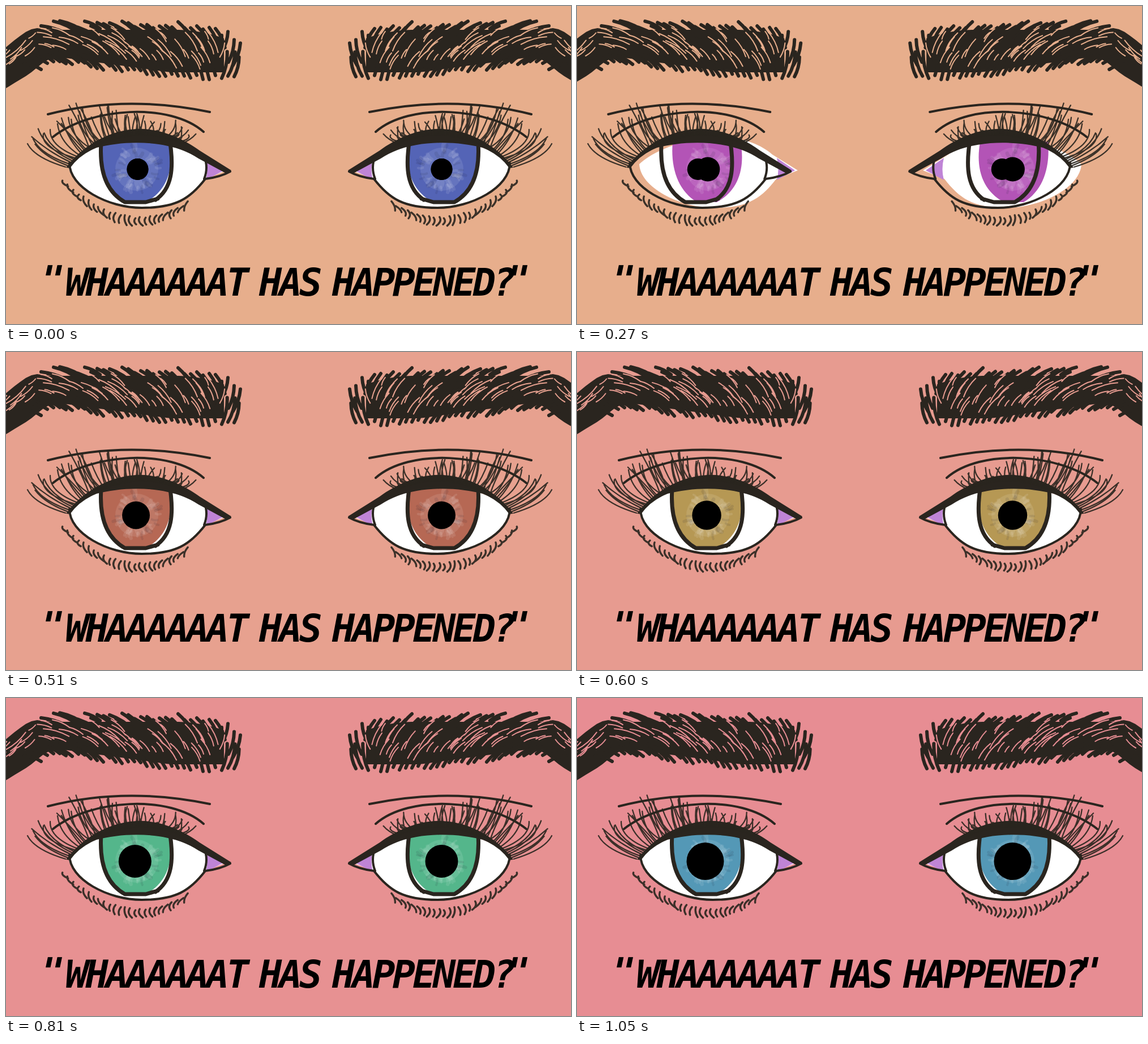
An HTML page for the animation above (1080 ms loop, 998 by 561 pixels).

```html
<!DOCTYPE html>
<html lang="en">
<head>
<meta charset="utf-8">
<title>Eyes</title>
<style>
  html, body { margin: 0; height: 100%; overflow: hidden; }
  svg { display: block; width: 100vw; height: 100vh; background: currentColor; }
  .ink { fill: none; stroke: #2a251f; stroke-linecap: round; stroke-linejoin: round; }
  .solid { fill: #2a251f; }
  .gap { fill: none; stroke: currentColor; stroke-width: 2; stroke-linecap: round; }
  text { font: italic bold 67px "DejaVu Sans Mono", monospace; letter-spacing: -4.8px; }
</style>
</head>
<body>
<svg id="stage" viewBox="0 0 998 561">
  <defs>
    <g id="eyeFill">
      <path fill="#fff" d="M110 279C150 240 280 205 345 262L390 290L352 305C325 340 300 357 240 356S112 320 110 279Z"/>
      <path fill="#bf84d6" d="M353 268L385 290L353 307Q358 288 353 268Z"/>
      <path fill="var(--iris)" d="M169 240C165 285 178 326 212 346H247C286 325 297 285 289 240Q230 230 169 240Z"/>
      <circle cx="231" cy="288" r="38" fill="#fff" opacity=".1"/>
      <g id="petals" fill="none" stroke-linecap="round"/>
    </g>
    <g id="eyeLines">
      <path class="solid" d="M106 285C140 240 190 219 230 217S310 232 342 255L398 290L390 296L340 269C290 235 210 237 160 250Q130 262 113 286Z"/>
      <path class="ink" stroke-width="4" d="M112 277C112 320 180 356 240 356S325 340 352 305Q378 302 396 292"/>
      <path class="ink" stroke-width="4" d="M350 265Q358 285 350 305M74 191Q210 156 360 187M83 231C150 178 290 170 349 222"/>
      <path class="ink" stroke-width="7" d="M168 242C165 287 174 326 210 346H247L268 340M290 242C296 285 294 322 264 342"/>
      <path id="upper" class="ink" stroke-width="2.3" opacity=".9"/>
      <path id="lower" class="ink" stroke-width="3.4" opacity=".9"/>
      <circle cx="232.5" cy="288" r="19"/>
    </g>
    <g id="brow">
      <path id="body" class="solid"/>
      <path id="hairs" class="ink" stroke-width="6"/>
      <path id="gaps" class="gap"/>
    </g>
  </defs>
  <use href="#eyeFill"/>
  <use href="#eyeFill" transform="translate(1001) scale(-1 1)"/>
  <circle id="leftPupil" cy="288"/>
  <circle id="rightPupil" cx="769.5" cy="288"/>
  <g id="lines">
    <use href="#eyeLines"/>
    <use href="#eyeLines" transform="translate(1002) scale(-1 1)"/>
    <use href="#brow"/>
    <use href="#brow" transform="translate(1021) scale(-1 1)"/>
  </g>
  <text x="105" y="511">WHAAAAAAT</text>
  <text x="447" y="511">HAS</text>
  <text x="576" y="511">HAPPENED?</text>
  <text transform="translate(56 506) skewX(-12)">"</text>
  <text transform="translate(878 506) skewX(-12)">"</text>
</svg>
<script>
const $ = id => document.getElementById(id);
const clamp = k => Math.min(1, Math.max(0, k));
const easeOut = k => 1 - (1 - clamp(k)) ** 2;
const mix = (a, b, k) => a + (b - a) * k;

let seed = 11;
const rand = (a, b) => mix(a, b, (seed = seed * 16807 % 2147483647) / 2147483647);

const curve = (...n) => {
  const [x, y, cx, cy, ex, ey] = n.map(v => v.toFixed(1));
  return `M${x} ${y}Q${cx} ${cy} ${ex} ${ey}`;
};

// A bent hair that starts at x, y and runs along an angle in degrees.
function hair(x, y, deg, len, bend) {
  const a = deg * Math.PI / 180, dx = Math.cos(a) * len, dy = Math.sin(a) * len;
  return curve(x, y, x + dx / 2 - dy * bend, y + dy / 2 + dx * bend, x + dx, y + dy);
}

function drawLashes() {
  let upper = '', lower = '';
  for (let u = 0; u <= 1; u += 1 / 62) {
    const x = 105 + 205 * u, y = 228 + 56 * ((x - 240) / 135) ** 2;
    const loose = u && 1;
    const tx = x - 67 * (1 - u) ** 2 + 16 * u + loose * rand(-13, 11);
    const ty = 174 + 69 * clamp(1 - u * 4) ** 1.5 + 34 * clamp(u * 2 - .8) + loose * rand(-4, 24);
    upper += curve(x, y, mix(tx, x, rand(0, .6)) + loose * rand(-9, 9), mix(y, ty, .4), tx, ty);
  }
  for (let x = 103; x < 325; x += 9) {
    const y = 380 - 68 * ((x - 235) / 133) ** 2;
    const lean = (235 - x) / 20 + rand(-4, 4), h = rand(5, 9);
    lower += curve(x - lean / 2, y - h, x - rand(3, 8), y, x + lean, y + h);
  }
  $('upper').setAttribute('d', upper);
  $('lower').setAttribute('d', lower);
}

function drawBrow() {
  const top = x => 33 + 82 * clamp((60 - x) / 105) ** 1.3 + 30 * clamp((x - 300) / 120) ** 2;
  const bottom = x => 100 + 75 * clamp((85 - x) / 130) ** 1.2 + 26 * clamp((x - 100) / 190);
  const angle = x => x < 55 ? 138 : x > 372 ? 106 : 18 + (x - 55) * .15;
  const edge = [], under = [];
  let hairs = '', gaps = '';
  for (let x = -45; x <= 385; x += 10) {
    const inset = 9 * clamp((x - 40) / 30);
    edge.push([x, top(x) + inset]);
    under.unshift([x, bottom(x) - inset]);
  }
  for (let x = 62; x < 420; x += 11) {
    const deg = angle(x) + rand(-5, 5);
    hairs += hair(x, top(x) + rand(-7, 6), deg, rand(30, 55), -.12);
    if (x < 405) hairs += hair(x, bottom(x) + rand(-6, 4), deg + 180, rand(30, 50), .12);
  }
  for (let i = 0; i < 68; i++) {
    const x = rand(-30, 405), y = mix(top(x), bottom(x), rand(.05, .6));
    gaps += hair(x, y, angle(x) + rand(-6, 6), rand(12, 48), -.12);
  }
  $('body').setAttribute('d', `M${[...edge, ...under].join('L')}Z`);
  $('hairs').setAttribute('d', hairs);
  $('gaps').setAttribute('d', gaps);
}

function drawPetals() {
  let out = '';
  for (let i = 0; i < 46; i++) {
    const deg = rand(0, 360), a = deg * Math.PI / 180, r = rand(20, 36);
    const d = hair(231 + r * Math.cos(a), 288 + r * Math.sin(a), deg + rand(-25, 25), rand(6, 13), .2);
    out += `<path d="${d}" stroke="${i % 3 ? '#fff' : '#223'}" stroke-width="${rand(3, 8).toFixed(1)}" opacity=".1"/>`;
  }
  $('petals').innerHTML = out;
}

const LOOP = 1080, STEP = 30, LAST = LOOP - STEP;

function frame(now) {
  const t = Math.floor(now % LOOP / STEP) * STEP, k = t / LAST;
  const blush = easeOut((t - 360) / 690);
  const hue = 230 + 172 * clamp(t / 600) ** 1.15 + 156 * easeOut((t - 600) / 450);
  const slide = -22 * Math.sin(Math.PI * clamp(t / 400));
  const radius = 19 + 14 * k ** 1.3;
  $('stage').style.color = `rgb(231,${mix(174, 141, blush)},${mix(140, 147, blush)})`;
  $('stage').style.setProperty('--iris', `hsl(${hue % 360},40%,52%)`);
  $('lines').setAttribute('transform', `translate(${slide})`);
  $('leftPupil').setAttribute('cx', 232.5 - 6 * k);
  for (const id of ['leftPupil', 'rightPupil']) $(id).setAttribute('r', radius);
  requestAnimationFrame(() => frame(performance.now() - start));
}

drawLashes();
drawBrow();
drawPetals();
const start = performance.now();
frame(0);
</script>
</body>
</html>
```
